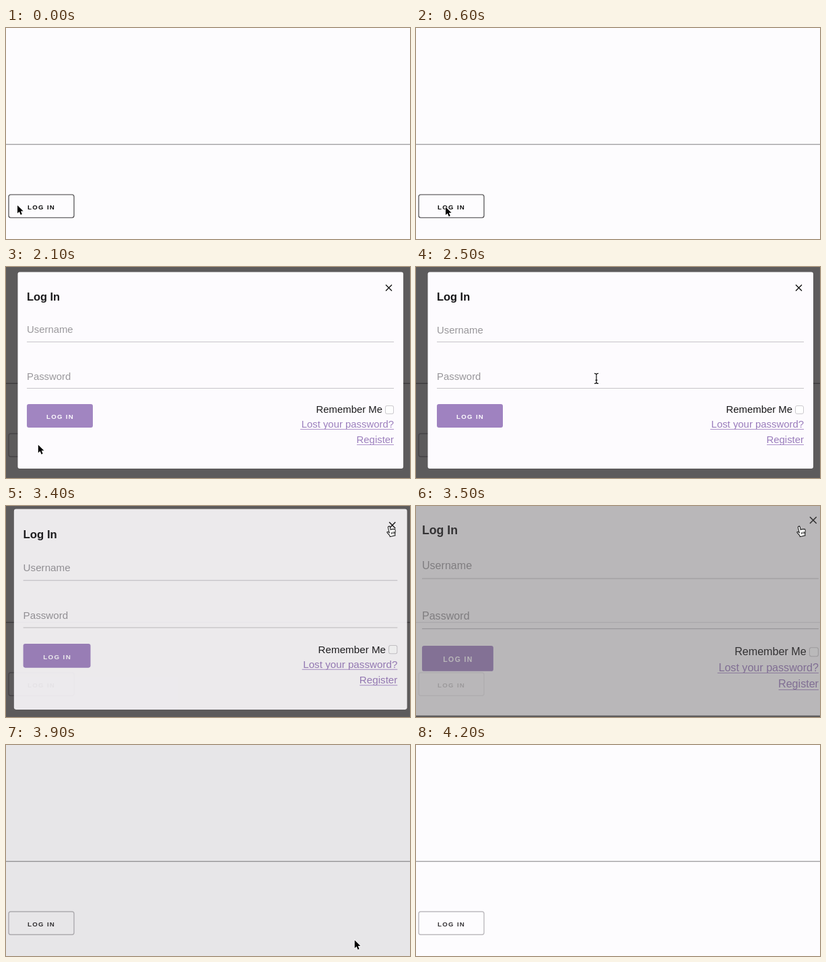
Animation, 600 px wide and 314 px high, one loop 4.8 s. Source, as an HTML page:

```html
<!DOCTYPE html>
<html lang="en">
<head>
<meta charset="utf-8">
<title>Log in popup</title>
<style>
html, body { margin: 0; width: 100%; height: 100%; overflow: hidden; background: #fdfcfe; }
svg { display: block; width: 600px; height: 314px; }
text { font: 14.9px "Liberation Sans", Arial, sans-serif; fill: #161517; }
.caps { font-size: 9.7px; font-weight: 700; letter-spacing: 1.3px; }
.title { font-size: 16.4px; font-weight: 700; }
.hint { fill: #98969a; }
.link { fill: #9a7cbc; }
.end { text-anchor: end; }
#page .caps { fill: #353336; }
#page rect { fill: none; stroke: #bdbbbf; stroke-width: 1.4; }
#page.hover .caps { fill: #0c0c0c; }
#page.hover rect { stroke: #3c3b3d; stroke-width: 1.1; }
</style>
</head>
<body>
<svg viewBox="0 0 600 314">
  <rect width="600" height="314" fill="#fdfcfe"/>
  <g id="page">
    <path d="M0 173.2H600" stroke="#7f7d80"/>
    <rect x="4" y="248" width="97" height="34.3" rx="3"/>
    <text class="caps" x="32" y="269.7">LOG IN</text>
  </g>
  <rect id="shade" width="600" height="314" fill="#040103" fill-opacity=".64"/>
  <g id="modal">
    <rect x="17.5" y="7.5" width="572.5" height="292.5" rx="3" fill="#fdfbfe"/>
    <g id="content">
      <path d="M564 26.5l9 9m0-9l-9 9" stroke="#111" stroke-width="1.4"/>
      <text class="title" x="31" y="50">Log In</text>
      <text class="hint" x="31" y="98.5">Username</text>
      <text class="hint" x="31" y="168">Password</text>
      <path d="M31 111.5H576M31 180.5H576" stroke="#c6c4c8"/>
      <rect x="31" y="204" width="98" height="35" rx="3" fill="#9f82c0"/>
      <text class="caps" x="60" y="226.3" style="fill:#fdfbfe">LOG IN</text>
      <text class="end" x="559" y="217.3">Remember Me</text>
      <rect x="563.5" y="206.5" width="12" height="12" rx="2.5" fill="#fff" stroke="#cccace"/>
      <text class="link end" x="576" y="239.3">Lost your password?</text>
      <text class="link end" x="576" y="261.8">Register</text>
      <path d="M437 241.5H576M521 264.5H576" stroke="#ab90c9"/>
    </g>
  </g>
  <use id="ghost" href="#page"/>
  <g id="cursor">
    <path id="arrow" d="M0 0V11.8L2.8 9.2L4.8 13.9L6.8 13L4.9 8.5H8.6Z" fill="#000" stroke="#fff" stroke-width="1.2" paint-order="stroke"/>
    <path id="beam" d="M-3 -7.5Q0 -7.5 0 -5.5Q0 -7.5 3 -7.5M0 -5.5V5.5M-3 7.5Q0 7.5 0 5.5Q0 7.5 3 7.5M-1.5 2.5H1.5" fill="none" stroke="#111" stroke-width="1.2"/>
    <path id="hand" transform="rotate(-14 2 8)" d="M-1.5 9L-3 7.2C-4 6.2 -5.2 7.2 -4.5 8.4L-2 13V15H6V13.2C7.5 10.5 8.2 9 8 6.5C8 5 6.2 4.9 6 6.1C6 4.6 3.8 4.5 3.7 5.8C3.7 4.3 1.5 4.4 1.4 5.6V.8C1.4 -1 -1.4 -1 -1.5 .8ZM1.5 9V12M3.7 9V12M5.7 9V12" fill="#fff" stroke="#111"/>
  </g>
</svg>
<script>
const $ = id => document.getElementById(id);
const LOOP = 4800, STEP = 100, OPEN = 1800;

// Eases from 0 to 1 between two times.
function ease(t, from, to) {
  const f = Math.min(1, Math.max(0, (t - from) / (to - from)));
  return f * f * (3 - 2 * f);
}

// The pointer goes to the button, then to the close icon, then away.
function pointerAt(t) {
  const press = ease(t, 300, 600), close = ease(t, 2050, 3050), leave = ease(t, 3700, 3900);
  return [
    17 + 27 * press + 526.5 * close - 52.7 * leave,
    264 + 2.5 * press - 236.5 * close + 260.5 * leave
  ];
}

function pointerShape(t, x, y) {
  const within = (left, top, right, bottom) => x > left && x < right && y > top && y < bottom;
  if (t >= 4000) return "";
  if (t < OPEN || t > 3700) return "arrow";
  if (within(31, 204, 129, 239) || within(560, 20, 580, 45)) return "hand";
  if (within(31, 80, 576, 111) || within(31, 150, 576, 181)) return "beam";
  return "arrow";
}

function draw(now) {
  const t = Math.floor(now % LOOP / STEP) * STEP;
  const opened = t >= OPEN ? 1 : 0;
  const fadeIn = ease(t, 1740, 2140), fadeOut = ease(t, 3320, 3720);
  const opacity = {
    shade: ease(t, 1700, 2000) - ease(t, 3630, 3980),
    modal: opened * (1 - fadeOut),
    content: fadeIn,
    ghost: opened * (1 - ease(t, OPEN, 2000))
  };
  for (const id in opacity) $(id).setAttribute("opacity", opacity[id]);

  const zoom = 1 + .005 * (1 - fadeIn) + .19 * fadeOut;
  $("modal").setAttribute("transform", `translate(304 154) scale(${zoom}) translate(-304 -154)`);
  $("page").setAttribute("class", t < 2100 ? "hover" : "");

  const [x, y] = pointerAt(t), shape = pointerShape(t, x, y);
  for (const id of ["arrow", "beam", "hand"]) $(id).style.display = id === shape ? "" : "none";
  $("cursor").setAttribute("transform", `translate(${x} ${y})`);
}

const start = performance.now();
(function tick() {
  draw(performance.now() - start);
  requestAnimationFrame(tick);
})();
</script>
</body>
</html>
```
